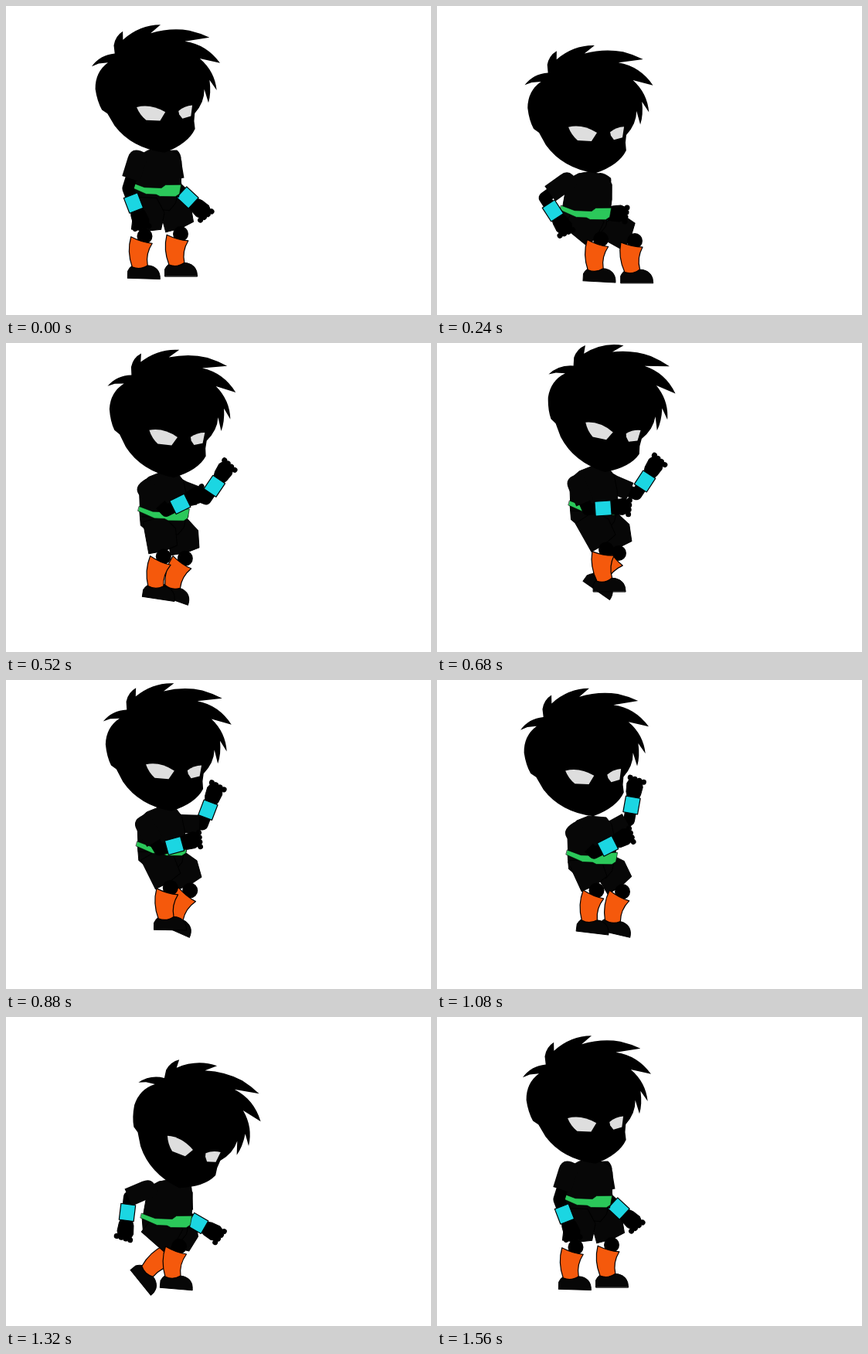
Animation of 550 by 400 pixels, one loop 1.6 s. Source, as an HTML page with a canvas:

```html
<!DOCTYPE html>
<html lang="en">
<head>
<meta charset="utf-8">
<title>Jumping fighter</title>
<style>
  html, body { margin: 0; width: 100%; height: 100%; overflow: hidden; background: #fff; }
  canvas { display: block; }
</style>
</head>
<body>
<canvas id="stage" width="550" height="400"></canvas>
<script>
const ctx = document.getElementById('stage').getContext('2d');
const LOOP = 1600, STEP = 40;
const BODY = '#070707', BLACK = '#000', CYAN = '#1bd6e2', GREEN = '#2bc85a', ORANGE = '#f5590c', EYE = '#dedede';

const path = d => new Path2D('M' + d + 'Z');

// Outlines around each part's own pivot
const shape = {
  head: path('-83 .5Q-72 -14 -53 -15.5L-54 -26Q-52 -38 -42 -44L-42 -33Q-20 -52 7 -51.5L-6 -41Q20 -48 44 -43.5 58 -40 70 -34L38 -29.5Q66 -25 83 -.5L57 -7Q76 10 78 34.5L69 21Q71 38 67 50.5L62 33Q62 50 49 64L48 74 49 84Q40 103 9 114 -33 108 -55 78L-64 62 -71 57Q-77 46 -79 30 -79 8 -62 -4L-74 -3'),
  eyeL: path('-26 54.5Q-8 50 11 61.5L4 72.5 -14 71.5Q-22 65 -26 54.5'),
  eyeR: path('28 60.5Q36 54 46 53.5L44 67.5 33 70.5 29 65'),
  torso: path('-31 4L-32 -25 -28 -40 -20 -47 -5 -53 18 -51 25 -42 29 -23 31 4'),
  pelvis: path('-32 0L29 0 27 16 20 26 -18 26 -29 18'),
  belt: path('-33 -6L-15 -1 7 -2 12 -6.5 32 -8.5 31 3.5 26 7.5 6 9 1 7 -12 7.5 -34 0'),
  shorts: path('-18 -8L-18 34 2 34 20 30 22 8 10 -10'),
  boot: path('-13.5 -5Q0 3 13.5 5 4 18 6 33 -4 39 -14 34 -20 14 -13.5 -5'),
  foot: path('-21 9L-21 0Q-17 -9 -8 -9L8 -8Q21 -5 21 9'),
  sleeve: path('-9 -9Q-3 -14 5 -12L28 -12 28 12 3 12Q-14 12 -9 -9'),
  cuff: path('-10.5 -9.5L10.5 -9.5 10.5 9.5 -10.5 9.5'),
  hand: path('8 -7L16 -10 27 -11 34 -8 34 7 25 10 15 9 8 7')
};

// Key poses; limbs are x, y, angle of the cuff or the boot
const pose = (at, hips, head, nearArm, farArm, nearLeg, farLeg) =>
  ({ at, hips, head, nearArm, farArm, nearLeg, farLeg });
const stand = pose(0, [194, 237], [194, 76], [165, 255, 69], [235, 248, 43], [175.5, 303, -3], [222, 300, -5]);
const POSES = [
  stand,
  pose(240, [193, 267], [196.5, 102.5], [150, 265, 57], [211, 269, 0], [208, 307, -2], [252, 309, -8]),
  pose(400, [205, 232], [203, 70.5], [232, 205, -41], [270, 193, -55], [190, 292.5, 12], [226.5, 293, 0]),
  pose(680, [204, 213], [226.5, 53], [215, 214, -4], [269, 179, -57], [215, 272.5, -10], [231, 277, 30]),
  pose(1080, [201, 229], [191, 62.5], [221, 215, -27], [252, 162, -80], [202.5, 277.5, 2], [236, 279, 8]),
  pose(1320, [208, 263], [250.5, 110], [157, 253, 97], [248, 267, 30], [220, 302, 0], [210, 309, 46]),
  { ...stand, at: 1560 }
];

const clamp = (v, lo, hi) => Math.min(hi, Math.max(lo, v));
const rad = deg => deg * Math.PI / 180;
const aim = (x0, y0, x1, y1) => Math.atan2(y1 - y0, x1 - x0) / rad(1);

// Smooth periodic interpolation without overshoot
function sample(part, t) {
  const n = POSES.length;
  const key = i => POSES[(i + n) % n];
  const time = i => key(i).at + LOOP * Math.floor(i / n);
  const slope = (i, k) => (key(i + 1)[part][k] - key(i)[part][k]) / (time(i + 1) - time(i));
  const tangent = (i, k) => {
    const a = slope(i - 1, k), b = slope(i, k);
    return a * b <= 0 ? 0 : 2 * a * b / (a + b);
  };
  let i = n - 1;
  while (POSES[i].at > t) i--;
  const span = time(i + 1) - time(i), u = (t - time(i)) / span;
  const ease = u * u * (3 - 2 * u);
  return key(i)[part].map((v, k) =>
    v + (key(i + 1)[part][k] - v) * ease +
    span * u * (1 - u) * ((1 - u) * tangent(i, k) - u * tangent(i + 1, k)));
}

function at(x, y, deg, draw) {
  ctx.save();
  ctx.translate(x, y);
  ctx.rotate(rad(deg));
  draw();
  ctx.restore();
}

function paint(p, color, line = 1) {
  ctx.fillStyle = color;
  ctx.fill(p);
  if (line) {
    ctx.lineWidth = line;
    ctx.strokeStyle = BLACK;
    ctx.stroke(p);
  }
}

function dot(x, y, r) {
  ctx.fillStyle = BLACK;
  ctx.beginPath();
  ctx.arc(x, y, r, 0, 7);
  ctx.fill();
}

// The thigh points from the hip to the knee; the foot hangs from the boot
function drawLeg([x, y, angle], hipX, hipY) {
  const kneeX = x + 4, kneeY = y - 5;
  const thigh = aim(hipX, hipY, kneeX, kneeY);
  const footAngle = Math.max(0, angle + 5);
  at(kneeX, kneeY, thigh - 90, () => at(0, -41, 0, () => paint(shape.shorts, BODY)));
  dot(kneeX, kneeY, 10);
  at(x, y, angle, () => {
    at(1, 41, footAngle - angle, () => paint(shape.foot, BODY));
    paint(shape.boot, ORANGE, 1.2);
  });
}

// The elbow lies straight behind the cuff
function drawArm([x, y, angle], shoulderX, shoulderY) {
  const elbowX = x - 20 * Math.cos(rad(angle)), elbowY = y - 20 * Math.sin(rad(angle));
  ctx.strokeStyle = BLACK;
  ctx.lineWidth = 15;
  ctx.beginPath();
  ctx.moveTo(shoulderX, shoulderY);
  ctx.lineTo(elbowX, elbowY);
  ctx.lineTo(x, y);
  ctx.stroke();
  at(shoulderX, shoulderY, aim(shoulderX, shoulderY, elbowX, elbowY), () => paint(shape.sleeve, BODY, 0));
  at(x, y, angle, () => {
    paint(shape.hand, BLACK);
    for (let i = 0; i < 4; i++) dot(35 - i, 6 * i - 8, 3.5);
    paint(shape.cuff, CYAN, 1.2);
  });
}

function render(t) {
  const [x, y] = sample('hips', t);
  const nearArm = sample('nearArm', t);
  let [headX, headY] = sample('head', t);
  // In the air the head swings forward, then back
  if (t > 680 && t < 1080) headX += 17 * Math.sin(2 * Math.PI * (t - 680) / 400);

  const lean = clamp(0.4 * (x - nearArm[0]), 0, 12);
  const nod = clamp(0.45 * (headX - x - 2.5), -1.2, 18);
  const shoulderY = y - 32 - 0.7 * lean;

  ctx.fillStyle = '#fff';
  ctx.fillRect(0, 0, 550, 400);
  ctx.lineJoin = ctx.lineCap = 'round';
  drawLeg(sample('farLeg', t), x + 20, y + 13);
  drawArm(sample('farArm', t), x + 20, shoulderY);
  at(x, y, 5, () => paint(shape.pelvis, BODY));
  drawLeg(sample('nearLeg', t), x - 9, y + 12);
  at(x, y, lean, () => paint(shape.torso, BODY));
  at(x, y, 5, () => paint(shape.belt, GREEN, 0.6));
  at(headX, headY, nod, () => {
    paint(shape.head, BLACK, 0);
    paint(shape.eyeL, EYE, 0);
    paint(shape.eyeR, EYE, 0);
  });
  drawArm(nearArm, x - 24, shoulderY);
}

function tick() {
  render(Math.floor(performance.now() % LOOP / STEP) * STEP);
  requestAnimationFrame(tick);
}
tick();
</script>
</body>
</html>
```
